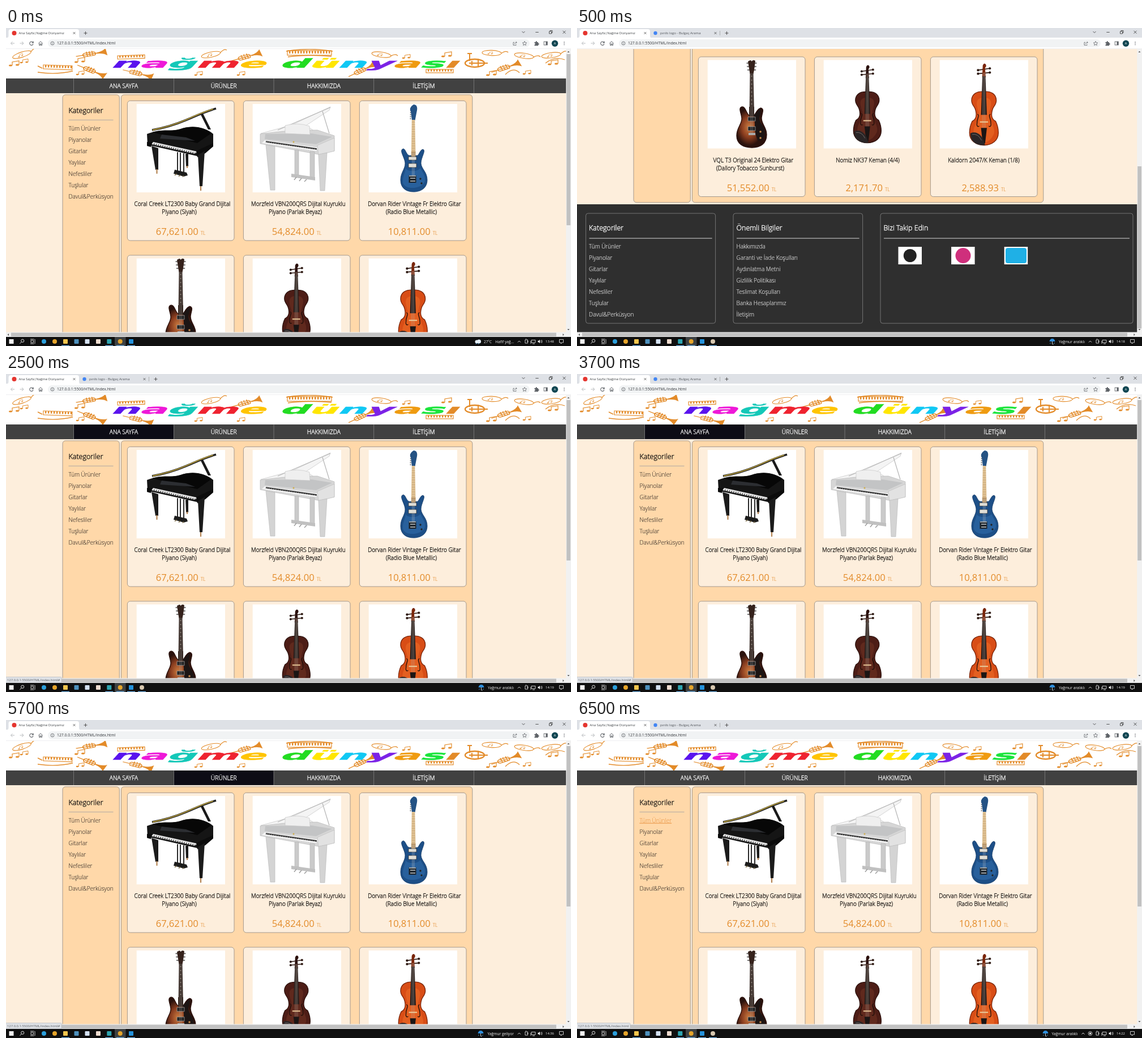
Animation of 998 by 561 pixels, one loop 8000 ms. Source, as an HTML page:

```html
<!DOCTYPE html>
<html lang="tr">
<head>
<meta charset="utf-8">
<title>Nağme Dünyamız</title>
<style>
html, body { margin: 0; width: 100%; height: 100%; overflow: hidden; background: #fdeedc; }
svg { display: block; width: 998px; height: 561px; font-family: "Open Sans", "Noto Sans", sans-serif; }
text { white-space: pre; }
.light { font-weight: 300; }
.page { animation: scroll 8s step-end infinite; }
@keyframes scroll {
  0% { transform: translateY(0); }
  6.25% { transform: translateY(-350px); }
  31.25%, 100% { transform: translateY(0); }
}
</style>
</head>
<body>
<svg id="stage" viewBox="0 0 998 561"></svg>
<script>
// Scene start times in percent of the loop; a digit string lists the scenes an item is seen in.
const cuts = [0, 6.25, 31.25, 56.25, 81.25];
const shows = ['0', '1', '2', '3', '4', '03', '12', '23', '124', '234', '0123'];
const sheet = document.createElement('style');
sheet.textContent = shows.map(s =>
  `@keyframes s${s}{${cuts.map((c, i) => `${c}%{opacity:${s.includes(i) ? 1 : 0}}`).join('')}}` +
  `.s${s}{animation:s${s} 8s step-end infinite}`).join('');
document.head.append(sheet);

const on = (scenes, body) => `<g class="s${scenes}">${body}</g>`;
const at = (x, y, body, more = '') => `<g transform="translate(${x} ${y}) ${more}">${body}</g>`;
const rect = (x, y, w, h, fill, more = '') => `<rect x="${x}" y="${y}" width="${w}" height="${h}" fill="${fill}" ${more}/>`;
const disc = (x, y, r, fill, more = '') => `<circle cx="${x}" cy="${y}" r="${r}" fill="${fill}" ${more}/>`;
const area = (d, fill, more = '') => `<path d="${d}" fill="${fill}" ${more}/>`;
const line = (d, color, w = 1, more = '') => `<path d="${d}" fill="none" stroke="${color}" stroke-width="${w}" ${more}/>`;
const text = (x, y, size, str, fill, more = '') =>
  `<text x="${x}" y="${y}" font-size="${size}" fill="${fill}" ${more}>${str.replace(/&/g, '&amp;')}</text>`;
const inked = (w, x, y, size, str, fill, more) => text(x, y, size, str, fill, `class="light" stroke="${fill}" stroke-width="${w}" ${more}`);
const thin = (x, y, size, str, fill, more = '') => inked(.12, x, y, size, str, fill, more);
const thick = (x, y, size, str, fill, more = '') => inked(size * .03, x, y, size, str, fill, more);
const mid = 'text-anchor="middle"';
const range = n => [...Array(n).keys()];
const mirror = body => body + `<g transform="scale(-1 1)">${body}</g>`;

// ---- instruments
function blackPiano() {
  const keys = range(20).map(i => line(`M${262 + i * 3.8} ${203.6 + i * .85}l-.5 2.2`, '#222', 1.3)).join('');
  return area('M317 222l5 0 0 22-4 0z', '#1c1c1c') +
    area('M249 187C272 178 288 184 308 178C327 172 352 174 366 187V205L352 214L338 226L250 206Z', '#151515') +
    area('M258 184C280 177 297 184 312 177C330 171 352 175 362 186L338 203Z', '#070707') +
    line('M258 180C282 176 300 170 319 162S350 148 371 142', '#222', 3.6) +
    line('M259 180C283 175 300 170 318 162S350 147 366 143', '#b39a3c', 1.8) +
    area('M344 153L348 151L362 179L357 179Z', '#1a1a1a') +
    area('M275 188L318 193L334 199L272 195Z', '#2c2e32') +
    area('M260 201L338 218L334 222L257 205Z', '#e6e6e6') + keys +
    area('M249 201L258 202L256 210L249 208ZM336 217L366 203V209L352 221L338 228Z', '#0c0c0c') +
    area('M257 208L269 212L269 250L264 250ZM339 224L351 217L347 279L342 279Z', '#1b1b1b') +
    line('M266.5 249v8M344 279v8M320 243v4', '#b58555', 2.2) +
    line('M303 219V253M308 220V255M314 221V256', '#2a2a2a', 2) +
    area('M298 250L319 255L321 260L314 262L296 257Z', '#1c1c1c') +
    line('M302 257l-4 3M308 259l-3 3M314 260l-2 3', '#7a6840', 1.2);
}

function whitePiano() {
  const gaps = range(22).map(i => line(`M${461 + i * 4} ${200.6 + i * .6}l-1 5`, '#eee', .7)).join('');
  return area('M450 186L505 171L573 139L571 145L530 172L548 184Z', '#f4f4f4', 'stroke="#c4c4c4" stroke-width=".7"') +
    line('M559 147L571 186M480 180L573 140', '#b5b5b5', 1.2) +
    area('M449 187L500 181L550 180L580 190V217L552 223L449 204Z', '#d6d6d6', 'stroke="#b2b2b2" stroke-width=".6"') +
    area('M458 187L540 186L576 192L548 205L457 196Z', '#c3c4c5') +
    area('M493 172Q515 166 536 173L537 188L493 186Z', '#efefef', 'stroke="#c8c8c8" stroke-width=".7"') +
    area('M457 198L551 211L548 217L452 203Z', '#f4f4f4') + line('M459 200.5L549 213.5', '#333', 2.6) + gaps +
    area('M550 207L580 194V217L552 224Z', '#e2e2e2', 'stroke="#bbb" stroke-width=".6"') +
    disc(508, 201, 1.5, '#cfae4e') +
    area('M459 206L475 209L475 286H467ZM552 223L567 220L563 287H555Z', '#d4d4d4', 'stroke="#b4b4b4" stroke-width=".6"') +
    area('M510 215H517V259H510ZM537 218H545V264H537Z', '#cacaca', 'stroke="#b0b0b0" stroke-width=".6"') +
    area('M504 257L546 263V269L504 263Z', '#c0c0c0') +
    line('M513 263l-4 5M522 265l-4 5M531 267l-4 4', '#999', 1.4);
}

function blueGuitar() {
  const frets = range(14).map(i => line(`M716.8 ${166 + i * 4.2}h5.6`, '#b79262', .6)).join('');
  const pegs = range(6).map(i => disc(715 - i * .1, 142 + i * 3.6, 1.1, '#777')).join('');
  return pegs + area('M720 135C725 135 727 139 726 145L722.5 163H717L715 147C712 143 715 138 720 135Z', '#245284') +
    area('M716.8 162H722.2L723.5 219H715.8Z', '#dfc193') + frets +
    area('M702 213C706 214 707 223 712 225H727C730 222 732 215 736 214C743 215 733 228 733 239C734 249 744 254 744 268C744 283 732 289 720 289C706 289 697 282 697 268C697 255 705 249 705 239C705 229 693 215 702 213Z', '#1d4f87', 'stroke="#123761" stroke-width=".8"') +
    area('M706 248C711 254 727 254 732 247C737 257 741 260 740 270C736 284 705 287 701 273C700 262 705 256 706 248Z', '#28609c') +
    rect(715.8, 218, 7.7, 9, '#b89567') +
    rect(711, 227, 14, 6, '#e3e1d9', 'stroke="#333" stroke-width=".8"') + rect(711, 239, 14, 7, '#e3e1d9', 'stroke="#333" stroke-width=".8"') +
    rect(711.5, 260, 13, 13, '#1d242b') + line('M712 261h12M714 265h9M714 270h9', '#bfc3c6', 1.4) +
    line('M717.6 220V262M719.4 220V262M721.2 220V262', '#ccc', .4) + disc(732, 266, 1.7, '#222') + disc(734, 274, 1.7, '#222');
}

function sunburstGuitar() {
  const pegs = range(3).map(i => line(`M${299.5 + i * .7} ${412 + i * 6}h${18 - i * 1.4}`, '#777', 2)).join('');
  const dots = range(10).map(i => disc(308.5, 435 + i * 7, .8, '#d9d2c1')).join('');
  return pegs + area('M302 409Q308 405 308.5 409Q311 405 315 408L313 424L311.5 431H305.5Z', '#35221c') +
    area('M305.5 430H311.5L313 506H304.5Z', '#33251f') + dots +
    area('M291 489C298 488 299 501 304 504H313C316 500 319 492 325 491C332 493 326 502 326 509C326 520 335 525 335 538C335 554 324 561 309 561C293 561 282 554 282 540C282 526 291 520 291 510C291 502 284 491 291 489Z', 'url(#burst)', 'stroke="#2a100b" stroke-width="1.3"') +
    area('M313 504Q318 497 324 493Q325 498 322 507C322 519 331 522 332 536Q328 552 319 548Q313 534 314 519Z', '#1c1514') +
    rect(304, 489, 9, 17, '#33251f') +
    rect(302, 507, 13, 7, '#222', 'stroke="#aaa" stroke-width=".7"') + rect(302, 524, 13, 7, '#222', 'stroke="#aaa" stroke-width=".7"') +
    rect(303, 535, 12, 4, '#aaa') + line('M306.5 430V537M308.5 430V537M310.5 430V537', '#aaa', .35) +
    disc(324, 533, 1.8, '#c68b4c') + disc(324, 544, 1.8, '#c68b4c');
}

function violin(body, edge, glow) {
  const outline = '48C12 47 21 52 21 63C21 71 15 73 14 80C12 88 14 95 20 98C23 104 24.5 110 24.5 117C24.5 130 14 138';
  const half = area(`M-.3 ${outline} -.3 138Z`, body) + line(`M0 ${outline} 0 138`, edge, 1.3) +
    area('M0 58C16 59 13 69 9 83C10 102 20 107 17 119Q11 132 0 134Z', glow, 'opacity=".35"') +
    line('M11 86q-3 1-1 6t2 12q-1 4-4 2', '#180b07', 1.2);
  const strings = range(4).map(i => line(`M${i - 1.5} 16L${(i - 1.5) * 1.7} 112`, '#b9ada0', .35)).join('');
  return mirror(half) + line('M-10 12L10 9M-10 18L10 16', '#2c1710', 1.6) +
    [[-10, 12], [-10, 18], [10, 9], [10, 16]].map(p => disc(...p, 2, '#2c1710')).join('') +
    area('M-2 4Q0-1 3 2Q5 5 2 8L3 24H-3Z', edge) + area('M-2.6 22H2.6L5 87H-5Z', '#251b19') + strings +
    rect(-7, 98, 14, 2, '#e9c797') + area('M-5 109H5L2 135H-2Z', '#1b1514') +
    area('M-23 118C-12 113-4 122-1 129L2 138C-12 139-23 133-23 118Z', '#2a2526') + line('M-20 120Q-10 118-4 130', '#776f6d', .9);
}

// ---- banner
const ink = '#e38b29';
const note = (x, y, k = 1) => at(x, y, `<ellipse cx="0" cy="0" rx="3" ry="1.6" fill="${ink}"/><ellipse cx="12" cy="-1" rx="3" ry="1.6" fill="${ink}"/>` + line('M3 0V-6L15-8V-1', ink, 1.2), `scale(${k})`);
const scrollMark = (x, y, turn) => at(x, y, `<ellipse rx="17" ry="4.6" fill="none" stroke="${ink}" stroke-width="1.1"/>` + note(-6, 2, .5) + line('M17 0q8-6 12-2', ink, 1.2), `rotate(${turn})`);
const keyboard = (x, y, w, h, turn = 0) => at(x, y, rect(0, 0, w, h, '#fff', `stroke="${ink}" stroke-width="1.2"`) +
  range(Math.floor(w / 5)).map(i => rect(3 + i * 5, 0, 2.4, h * .62, ink)).join(''), `rotate(${turn})`);
const horn = (x, y, turn) => at(x, y, line('M-27 0H14M-12-4H6Q11 0 6 4H-12Q-17 0-12-4M-7-7V5M-2-7V5M3-7V5', ink, 1.7) + area('M10-1Q23-2 28-9V9Q23 2 10 1Z', ink), `scale(1 .75) rotate(${turn})`);

function banner() {
  const hues = ['#5a13ee', '#ee18d8', '#14c8b8', '#ef2330', '#ffc400', '#fff', '#22dc22', '#ffe600', '#10c8f4', '#7b22e6', '#ef9b10', '#1be53c', ink];
  const word = [...'nağme dünyası'].map((c, i) => `<tspan fill="${hues[i]}" stroke="${hues[i]}">${c}</tspan>`).join('');
  return rect(0, 37, 990, 52, '#fff') +
    note(8, 66) + note(27, 61, .8) + scrollMark(28, 47, -18) + keyboard(66, 65, 51, 7, 2) + line('M56 78Q88 83 118 76M64 71l-8-4', ink, 1.4) +
    note(124, 60) + horn(150, 46, -12) + note(126, 82, .8) + horn(150, 75, 28) +
    keyboard(197, 49, 48, 6, -2) + horn(232, 80, 18) + scrollMark(362, 47, -12) + note(335, 83, .8) +
    horn(424, 51, -20) + note(410, 83, .8) + keyboard(497, 40, 78, 8) + line('M495 41Q535 34 577 41M498 51Q533 46 575 50', ink, 1.6) +
    scrollMark(663, 47, 8) + horn(628, 75, -32) + note(702, 53, .8) + keyboard(742, 73, 48, 6) + note(772, 50) +
    at(828, 62, `<ellipse rx="17" ry="7" fill="#fff" stroke="${ink}" stroke-width="2.4"/>` + line('M-10 0H23M-5-4V4M6-6V6M-9-17V-4M-13-17h8', ink, 2)) +
    scrollMark(858, 44, 2) + note(851, 83) + horn(882, 70, -24) + scrollMark(915, 49, 8) + note(915, 81, .8) + note(960, 64) + line('M953 62Q969 49 987 56M882 82q14-14 25-3', ink, 1.3) + scrollMark(963, 48, -8) +
    `<text transform="translate(187 70) scale(3.25 1) skewX(-5)" font-family="DejaVu Sans, sans-serif" font-size="22" font-weight="700" font-style="italic" stroke-width=".4">${word}</text>`;
}

// ---- page
const cards = [
  ['Coral Creek LT2300 Baby Grand Dijital', 'Piyano (Siyah)', '67,621.00'],
  ['Morzfeld VBN200QRS Dijital Kuyruklu', 'Piyano (Parlak Beyaz)', '54,824.00'],
  ['Dorvan Rider Vintage Fr Elektro Gitar', '(Radio Blue Metallic)', '10,811.00'],
  ['VQL T3 Original 24 Elektro Gitar', '(Dallory Tobacco Sunburst)', '51,552.00'],
  ['Nomiz NK37 Keman (4/4)', '', '2,171.70'],
  ['Kaldorn 2047/K Keman (1/8)', '', '2,588.93']
];
const kinds = ['Tüm Ürünler', 'Piyanolar', 'Gitarlar', 'Yaylılar', 'Nefesliler', 'Tuşlular', 'Davul&Perküsyon'];
const infos = ['Hakkımızda', 'Garanti ve İade Koşulları', 'Aydınlatma Metni', 'Gizlilik Politikası', 'Teslimat Koşulları', 'Banka Hesaplarımız', 'İletişim'];
const frame = (color, r) => `rx="${r}" stroke="${color}" stroke-width=".8"`;

function card([first, second, price], i) {
  const x = i % 3 * 205, y = i > 2 ? 272.5 : 0, dark = '#1b1815';
  return at(x, y, rect(214.4, 128.4, 188.6, 246.6, '#fdeedc', frame('#8d8780', 5)) + rect(230.7, 134, 156.3, 156, '#fff') +
    thick(second ? 311.4 : 308.5, 314, 10, first, dark, mid) + thick(306, 328, 10, second, dark, mid) +
    `<text x="308.5" y="365" ${mid} fill="#e38b29" font-size="16.6">${price}<tspan class="light" dx="4" font-size="8.3" stroke="#e38b29" stroke-width=".12">TL</tspan></text>`);
}

function navBar() {
  const names = ['ANA SAYFA', 'ÜRÜNLER', 'HAKKIMIZDA', 'İLETİŞİM'];
  const hover = i => rect(119.8 + i * 176.7, 89.5, 176.2, 25, '#0d0c15');
  return rect(0, 89, 990, 26, '#414141') + on('2', hover(0)) + on('3', hover(1)) +
    range(5).map(i => rect(119.3 + i * 176.7, 89, .7, 26, '#8a8a8a')).join('') +
    names.map((n, i) => thick(208 + i * 176.7, 105.8, 10.4, n, '#fff', mid)).join('');
}

function footer() {
  const box = (x, w, title, items) => rect(x, 677, w, 194, 'none', frame('#868686', 4)) +
    thick(x + 5.5, 706.5, 12.5, title, '#fff') + rect(x + 6, 720.5, w - 12, 1, '#d8d8d8') +
    items.map((s, i) => thin(x + 5.5, 738.7 + i * 20, 10, s, '#f2f2f2')).join('');
  return rect(0, 661, 990, 230, '#2f2f2f') + box(15.6, 229, 'Kategoriler', kinds) + box(276, 228.6, 'Önemli Bilgiler', infos) + box(536, 446, 'Bizi Takip Edin', []) +
    range(3).map(i => rect(567.5 + i * 93.6, 736, 41.5, 31, '#fff')).join('') +
    disc(588.3, 751.5, 11.5, '#222') + disc(682, 751.5, 13.5, '#cf2f7c') + rect(757, 738, 37, 27, '#1fb0e6', 'rx="4"');
}

function page() {
  const link = (s, i, fill = '#38312a', more = '') => thin(110.5, 180.7 + i * 20, 10, s, fill, more);
  return rect(0, 37, 990, 860, '#fdeedc') + banner() + navBar() +
    rect(100, 117.8, 100.3, 540, '#ffd8a9', frame('#8d8780', 5)) + rect(203.5, 117.8, 620.3, 540, '#ffd8a9', frame('#8d8780', 5)) +
    thick(110.5, 150, 12.5, 'Kategoriler', '#1b1815') + rect(110.5, 161.8, 79, .9, '#a3a3a3') +
    on('0123', link(kinds[0], 0)) + on('4', link(kinds[0], 0, '#e9994a', 'text-decoration="underline"')) +
    kinds.slice(1).map((s, i) => link(s, i + 1)).join('') + cards.map(card).join('') +
    blackPiano() + whitePiano() + blueGuitar() + sunburstGuitar() +
    at(512.8, 414.5, violin('#4d1d16', '#2b100c', '#84402c')) + at(718.8, 411.8, violin('#d84d16', '#7a260b', '#f58135'), 'scale(1.04 1.05)') + footer();
}

// ---- browser frame
const gray = '#5f6368';
const cross = (x, y, r, c, w) => line(`M${x - r} ${y - r}l${2 * r} ${2 * r}m0-${2 * r}l-${2 * r} ${2 * r}`, c, w);
const plus = x => line(`M${x - 3} 9h6m-3-3v6`, '#444', .9);

function browser() {
  return rect(0, 0, 998, 17.5, '#dee1e6') + area('M1 17.5Q4.5 17.5 4.5 13V6Q4.5 2 9 2H125Q129 2 129 6V13Q129 17.5 132 17.5Z', '#fff') +
    rect(0, 17, 998, 20, '#fff') + disc(14.5, 9, 4, '#e5352f') + text(22.5, 11.2, 6, 'Ana Sayfa|Nağme Dünyamız', '#3c4043') + cross(120.5, 9, 1.9, '#444', .8) +
    on('124', disc(138.5, 9, 3.2, '#4285f4') + text(147, 11.2, 6, 'pırıltı logo - Bulgaç Arama', '#4b4f54') + cross(244.5, 9, 1.9, '#444', .8) + rect(252, 5, .6, 8, '#8b8e92') + plus(264.5)) + on('03', plus(140.5)) +
    line('M911.5 6l2.5 2.5 2.5-2.5M935.3 7.5h5.4M959.5 6h4v4h-4zM961 6v-1.5h4v4h-1.5', '#333', .8) + cross(986, 7.3, 2.5, '#333', .8) +
    rect(74, 20, 851, 14, '#f1f3f4', 'rx="7"') + rect(0, 36.5, 998, .5, '#dcdfe3') +
    line('M15 27H8.5m3-3l-3 3 3 3', '#b7babd', 1) + line('M24.5 27H31m-3-3l3 3-3 3', '#b7babd', 1) +
    line('M47.7 25.5A3.2 3.2 0 1 0 48 28.3M48.2 23.5v2.7h-2.7', gray, 1.1) + line('M57.5 27.2L61 23.5l3.5 3.7M58.7 26.5v4h1.7v-2.5h1.5v2.5h1.6v-4', gray, 1) +
    disc(82, 27, 3, 'none', `stroke="${gray}" stroke-width=".8"`) + line('M82 26.5v2.3M82 25v.8', gray, .8) + text(90, 29.4, 6.8, '127.0.0.1:5500/HTML/index.html', '#303338') +
    line('M898 25.3h-2v5h5v-1.5M898 28.4Q899 25.4 902 25.4m-1.4-1.6l1.7 1.6-1.7 1.7', gray, .8) +
    area('M916 23.4l1.1 2.4 2.6.3-1.9 1.8.5 2.6-2.3-1.3-2.3 1.3.5-2.6-1.9-1.8 2.6-.3z', 'none', `stroke="${gray}" stroke-width=".8"`) +
    area('M933.5 25h2q0-2 1.3-2t1.3 2h2v2q1.7 0 1.7 1.3t-1.7 1.3v1.6h-6.6v-2q1.5-.2 1.5-1.2t-1.5-1z', gray) +
    rect(950.2, 24, 6, 6, 'none', `stroke="${gray}" stroke-width=".9"`) + rect(953.5, 24, 2.8, 6, gray) +
    disc(969.5, 27.3, 5.7, '#114652') + text(969.5, 29.3, 5.5, 'A', '#fff', mid) + range(3).map(i => disc(986, 24.7 + i * 2.4, .75, gray)).join('');
}

function scrollBars() {
  const thumb = (y, h) => rect(990.2, y, 6.8, h, '#c1c1c1');
  const status = (s, w) => rect(-1, 534.5, w, 10.5, '#dee1e6', 'rx="1.5" stroke="#b9bcc0" stroke-width=".7"') + text(2, 542, 5.9, s, '#5b5f64');
  return rect(989.2, 37, 8.8, 508, '#f1f1f1') + rect(0, 536.5, 990, 8.5, '#f1f1f1') + rect(9, 537.6, 963, 6.6, '#c1c1c1') +
    on('0', thumb(46, 302)) + on('1', thumb(244, 286)) + on('234', thumb(46, 283)) +
    area('M991.5 43l2-2.3 2 2.3zM991.5 531l2 2.3 2-2.3zM5 539l-2.3 2 2.3 2zM983.5 539l2.3 2-2.3 2z', '#555') +
    on('23', status('127.0.0.1:5500/HTML/index.html#', 99)) + on('4', status('127.0.0.1:5500/HTML/index.html', 95));
}

function taskBar() {
  const white = '#f4f4f4';
  const app = (x, c) => rect(x - 4, 549, 8, 8, c, 'rx="1"'), dot = (x, c) => disc(x, 553, 4, c);
  const open = x => rect(x - 7, 559.8, 14, 1.2, '#76b9ed');
  const clock = s => text(960.5, 555.2, 5.8, s, white, mid);
  const rain = x => area(`M${x - 5} 553Q${x - 4} 548 ${x} 548T${x + 5} 553Z`, '#2f8fdc') + line(`M${x} 553v4q0 1.5 2 1`, '#dce8f2', .9) + line(`M${x - 3} 555l-1 2M${x + 4} 555l-1 2`, '#58b5f2', .8);
  const caret = x => line(`M${x - 2.5} 554.5l2.5-2.5 2.5 2.5`, white, .9);
  const label = (s, end = 897) => text(end, 555.8, 6.7, s, white, 'text-anchor="end"');
  return rect(0, 545, 998, 16, '#101010') + rect(192, 545, 19.5, 16, '#3d4143') + rect(5.5, 549, 8, 8, white) +
    disc(29.2, 551.8, 2.6, 'none', `stroke="${white}" stroke-width=".9"`) + line('M27.4 553.8l-3 3', white, .9) +
    rect(44, 551, 4.5, 4, 'none', `stroke="${white}" stroke-width=".8"`) + line('M43 549h6.5M43 557h6.5M51 549v8', white, .8) +
    dot(67, '#2b9fdc') + dot(86, '#e6a52b') + app(105, '#f4c64e') + app(124.5, '#4e91bd') + app(143.5, '#d5e2f3') + app(163, '#f0ddd0') + app(182.3, '#2ea5b0') + dot(201.7, '#e6a52b') + app(221, '#2492dc') +
    [105, 182.3, 201.7, 221].map(open).join('') + on('124', dot(240, '#d8c8b0') + open(240)) +
    on('0', disc(831.5, 553.5, 3, '#e4eef8') + disc(835.5, 553, 3.6, '#e4eef8') + line('M831 556l-1 2M835 556l-1 2', '#52b2f4', .9) + text(844, 555.8, 6.4, '27°C', white) + label('Hafif yağ...') + caret(906.5) + clock('13:48')) +
    on('12', rain(839.5) + label('Yağmur aralıklı') + caret(906.5)) + on('1', clock('14:18')) + on('2', clock('14:19')) +
    on('3', rain(838.5) + label('Yağmur geliyor') + caret(906.5) + clock('14:36')) +
    on('4', rain(827.5) + label('Yağmur aralıklı', 884.5) + caret(894) + disc(906.5, 553, 3.4, 'none', `stroke="${white}" stroke-width=".8"`) + disc(906.5, 553, 1.7, white) + clock('14:22')) +
    line('M917 550h4.5v6H917zM918.5 549v-1M920 553h3M928 550.5h7v4.5h-7zM930 557h4M927 552v5', white, .8) +
    area('M939.5 551.8h1.5l2-2v6.4l-2-2h-1.5z', white) + line('M944.5 551q1.5 2 0 4M946 550q2.5 3 0 6', white, .7) +
    line('M977.5 549.5h7v5.5h-2.7l-1.5 2v-2h-2.8z', white, .8);
}

document.getElementById('stage').innerHTML =
  '<defs><clipPath id="view"><rect x="0" y="37" width="990" height="500"/></clipPath>' +
  '<radialGradient id="burst" cx=".42" cy=".5"><stop offset=".1" stop-color="#c0703a"/><stop offset=".5" stop-color="#8a3d1f"/><stop offset=".9" stop-color="#2a120d"/></radialGradient></defs>' +
  `<g clip-path="url(#view)"><g class="page">${page()}</g></g>` + browser() + scrollBars() + taskBar();
</script>
</body>
</html>
```
